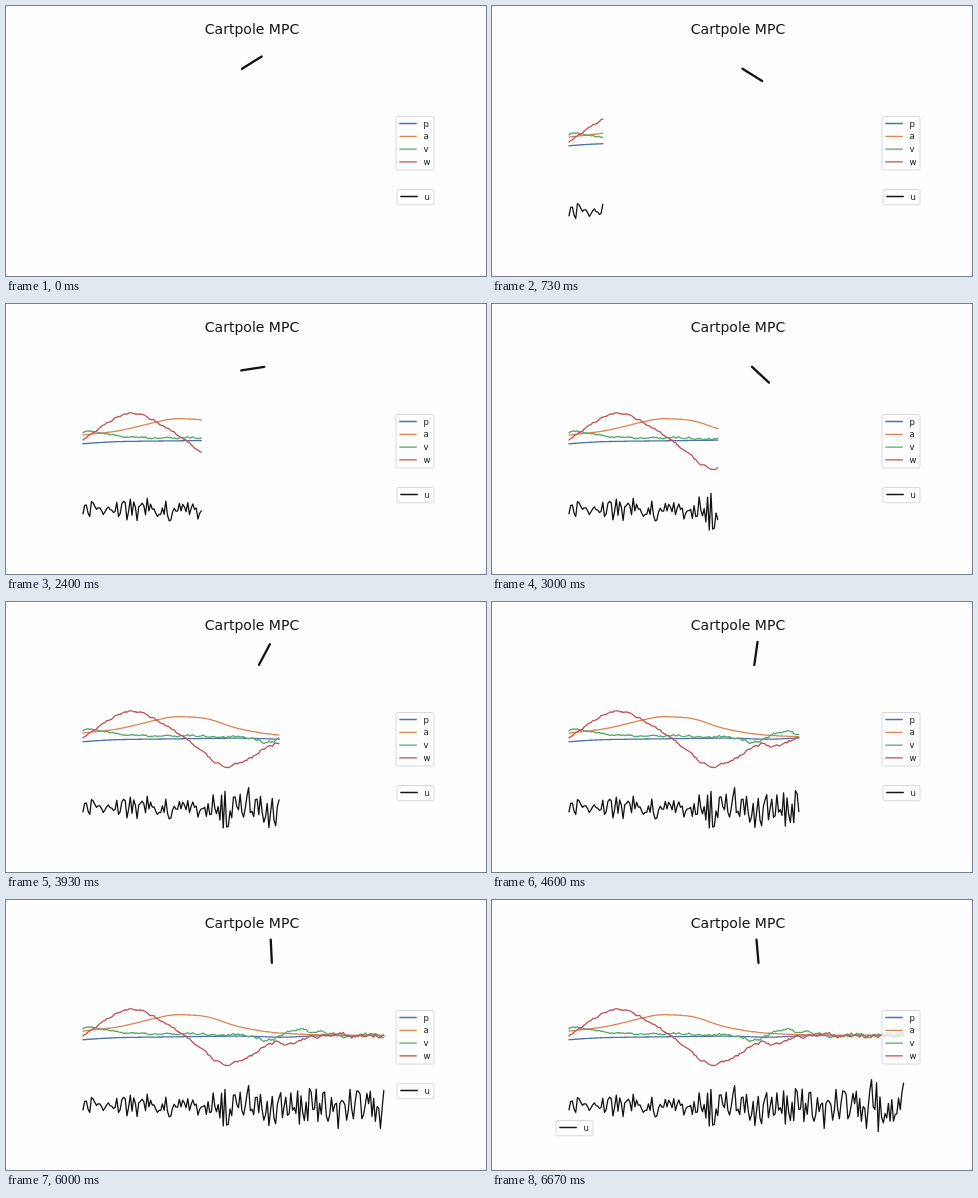
These frames come from a looping animation (480 px wide and 270 px high, 6740 ms). An HTML page with a canvas:

```html
<!DOCTYPE html>
<html lang="en">
<head>
<meta charset="utf-8">
<title>Cartpole MPC</title>
<style>
  html, body { margin: 0; width: 100%; height: 100%; overflow: hidden; background: #fefefe; }
  canvas { display: block; }
</style>
</head>
<body>
<canvas id="stage" width="480" height="270"></canvas>
<script>
const ctx = document.getElementById('stage').getContext('2d');
const LOOP = 6740, LAST = 100;
const LEFT = 77, STEP = 3.38, ZERO = 135.3, CONTROL = 206;
const INK = '#141416';
const COLORS = { p: '#4c72b0', a: '#dd8452', v: '#55a868', w: '#c44e52', u: INK };
const FONT = '"DejaVu Sans", Verdana, sans-serif';

function seeded(seed) {
  return () => (seed = (seed * 16807) % 2147483647) / 2147483647;
}

// Smooth curve through [x, y] keys (cubic Hermite, finite-difference tangents).
function curve(keys) {
  const tangent = i => {
    const a = keys[Math.max(i - 1, 0)], b = keys[Math.min(i + 1, keys.length - 1)];
    return (b[1] - a[1]) / (b[0] - a[0]);
  };
  return x => {
    let i = 0;
    while (i < keys.length - 2 && x > keys[i + 1][0]) i++;
    const [x0, y0] = keys[i], [x1, y1] = keys[i + 1];
    const h = x1 - x0, s = (x - x0) / h, r = 1 - s;
    return r * r * (1 + 2 * s) * y0 + s * s * (3 - 2 * s) * y1
         + h * s * r * (r * tangent(i) - s * tangent(i + 1));
  };
}

// Cart position in pixels, pole angle in degrees from upright, angular velocity; all by step.
const cart = curve([[0, 236], [5, 244], [11, 250.5], [25, 255], [45, 260], [52, 257.5],
  [59, 253], [70, 263], [80, 265], [100, 266.5]]);
const angle = curve([[0, 58], [11, 122], [25, 271], [30, 283], [37, 252], [45, 133],
  [52, 66], [59, 28], [73, 4], [100, -5]]);
const spin = curve([[0, 0], [14, 26], [30, 0], [42, -28.5], [57, -6.5], [60, -9.5],
  [68, -1], [100, 0]]);
const speed = step => (cart(step + 0.5) - cart(step - 0.5)) * 4.5;

// Correlated measurement noise that grows over the run.
function noise(seed) {
  const random = seeded(seed);
  let value = 0;
  return step => {
    value = 0.6 * value + random() - 0.5;
    return value * (1.5 + 4 * (step / LAST) ** 2);
  };
}

// Control signal: random jitter whose spread widens once the pole swings back up.
function control(seed) {
  const random = seeded(seed);
  return step => {
    const spread = step < 37 ? 13 : 28;
    return (random() + random() - 1) * spread;
  };
}

// Two samples per step.
function samples(center, value) {
  return Array.from({ length: 2 * LAST - 1 }, (_, k) =>
    [LEFT + k * STEP / 2, center - value(k / 2)]);
}

const speedNoise = noise(91), spinNoise = noise(523), jitter = control(4711);
const traces = {
  p: samples(ZERO, s => (cart(s) - 266) * 0.148),
  a: samples(ZERO, s => angle(s) / 13.8),
  v: samples(ZERO, s => speed(s) + speedNoise(s)),
  w: samples(ZERO, s => spin(s) + spinNoise(s)),
  u: samples(CONTROL, jitter)
};

function text(str, x, y, size, align = 'left') {
  ctx.font = `${size}px ${FONT}`;
  ctx.textAlign = align;
  ctx.fillStyle = INK;
  ctx.fillText(str, x, y);
}

function polyline(points, color, width) {
  ctx.strokeStyle = color;
  ctx.lineWidth = width;
  ctx.beginPath();
  for (const [x, y] of points) ctx.lineTo(x, y);
  ctx.stroke();
}

function legend(x, y, width, height, labels) {
  ctx.beginPath();
  ctx.roundRect(x, y, width, height, 1.7);
  ctx.fillStyle = 'rgba(254,254,254,0.8)';
  ctx.fill();
  ctx.strokeStyle = '#d8d8dc';
  ctx.lineWidth = 1;
  ctx.stroke();
  labels.forEach((label, i) => {
    const rowY = y + 7 + i * 12.8;
    polyline([[x + 3.8, rowY], [x + 20.3, rowY]], COLORS[label], 1.3);
    text(label, x + 27.6, rowY + 3, 8.5);
  });
}

function draw(step) {
  ctx.fillStyle = '#fefefe';
  ctx.fillRect(0, 0, 480, 270);
  ctx.lineCap = ctx.lineJoin = 'round';
  text('Cartpole MPC', 246, 28, 14, 'center');

  const baseX = cart(step), baseY = 62.8, turn = angle(step) * Math.PI / 180;
  const tip = [baseX + 23.2 * Math.sin(turn), baseY - 23.2 * Math.cos(turn)];
  polyline([[baseX, baseY], tip], INK, 2.3);

  const shown = Math.max(0, 2 * step - 1);
  for (const name in traces) polyline(traces[name].slice(0, shown), COLORS[name], 1.3);

  legend(390, 110.5, 38, 53.5, ['p', 'a', 'v', 'w']);
  // The control legend moves away when its trace reaches it.
  const [x, y] = step < 94 ? [391, 183.5] : [64, 220.5];
  legend(x, y, 37, 15.3, ['u']);
}

// Steps are 1/15 s long, with start times rounded to 10 ms.
function stepNumber(t) {
  let step = Math.min(LAST, Math.floor(t * 15 / 1000) + 1);
  while (Math.round(step * 20 / 3) * 10 > t) step--;
  return step;
}

const start = performance.now();
function tick() {
  draw(stepNumber((performance.now() - start) % LOOP));
  requestAnimationFrame(tick);
}
tick();
</script>
</body>
</html>
```
